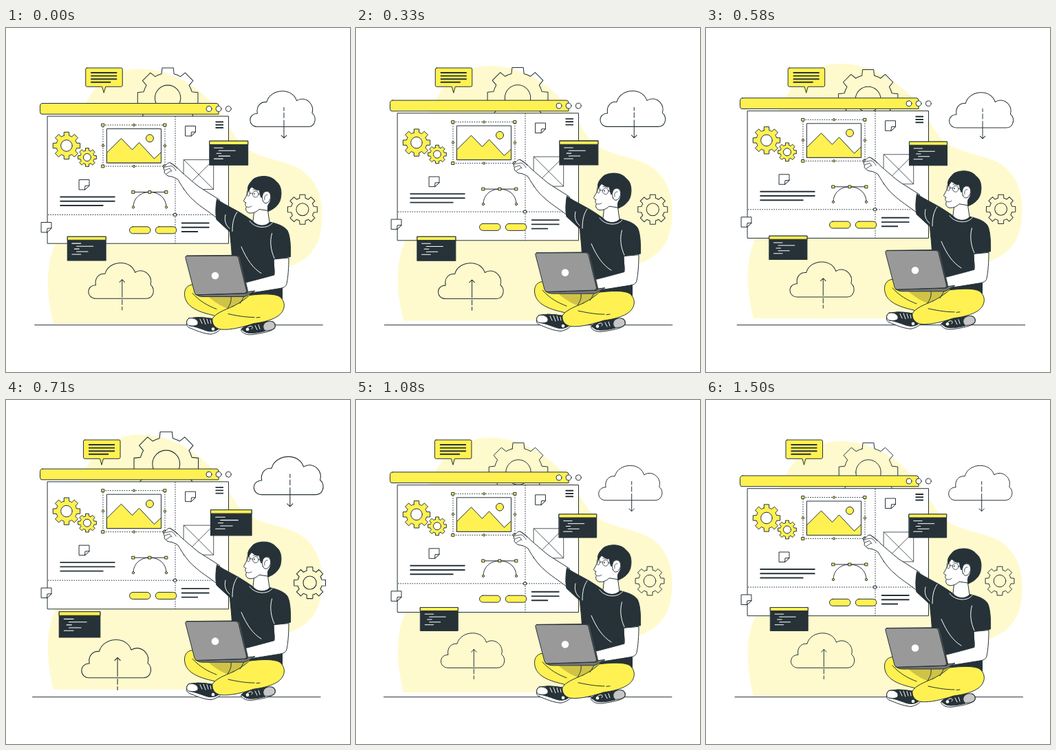
An HTML page that plays this animation: 500x500 px, repeating every 1540 ms.

```html
<!DOCTYPE html>
<html lang="en">
<head>
<meta charset="utf-8">
<title>Web design workspace</title>
<style>
html, body { margin: 0; width: 100%; height: 100%; overflow: hidden; background: #fff; }
svg { display: block; width: 100vw; height: 100vh; }
.ink { fill: none; stroke: #263238; stroke-width: 1; stroke-linecap: round; stroke-linejoin: round; }
.w { fill: #fff; }
.y { fill: #fff152; }
.d { fill: #263238; }
.bold { stroke-width: 1.9; stroke-linecap: butt; }
.thin { stroke-width: .8; }
.dots { stroke-dasharray: 1.6 1.8; stroke-linecap: butt; }
.chalk { fill: none; stroke: #fff; stroke-width: 1; stroke-linecap: round; }
</style>
</head>
<body>
<svg viewBox="0 0 500 500" xmlns="http://www.w3.org/2000/svg">
  <defs>
    <path id="cloud" class="ink" d="M10 50.5C4 50.5 0 46 0 41C0 35.5 4.5 31.3 10.4 31.6C8.5 22 14.5 14.5 23.5 15.5C26 5.5 36 0 46 0C56 0 63.5 5.5 66 13.5C72 9.5 80 10.5 85 16.5C88.8 21 89.5 26 88 31C92 34 93.5 40 91 45C89.5 48.5 86 50.5 82 50.5Z"/>
    <g id="term">
      <path class="ink d" d="M0 0H54.5V34H0Z"/>
      <path class="ink y" d="M0 0H54.5V5H0Z"/>
      <path class="chalk" d="M6.5 9.7H19M13 13.7H36.5M10 17.5H16.5M13 21.3H29M6.5 25.2H19"/>
    </g>
    <g id="note" class="ink">
      <path class="w" d="M0 0H14.5V8.5L8 14.5H0Z"/>
      <path class="w" d="M8 14.5L8.5 8.8L14.5 8.5Z"/>
    </g>
    <path id="knob" class="ink y" d="M-1.9-1.9H1.9V1.9H-1.9Z"/>
    <circle id="dot" class="ink y" r="1.6"/>
    <rect id="pill" class="ink y" width="30.5" height="10" rx="5"/>
  </defs>

  <g class="float">
    <path fill="#fffacd" d="M69 430.5C62 402 53 350 73 312C90 270 66 210 85 165C97 141 108 126 116 109C132 77 162 60 195 60C236 60 273 81 300 110C327 139 330 163 352 177C371 190 402 192 425 204C449 218 460 243 459.5 272C459.500 305 451 333 413 347C392 356 378 366 370 384L350 430.5Z"/>
  </g>
  <g class="beat"><path id="cog" class="ink"/></g>
  <path class="ink shake" d="M42 431.7H460.5"/>

  <g class="float">
    <g class="ink">
      <path class="w" d="M60.5 128.7H323.5V313.7H60.5Z"/>
      <path class="y" d="M53 110H306Q309 110 309 114V125.7H52Q49.5 125.7 49.5 122V114.5Q49.5 110 53 110Z"/>
      <circle class="w" cx="295" cy="118" r="4"/>
      <circle class="w" cx="309" cy="118" r="4"/>
      <circle class="w" cx="323.3" cy="118" r="4"/>
      <path class="dots" d="M246 129V313.5M61 272H323"/>
      <path class="w" d="M244 270.2H247.6V273.8H244Z"/>
      <path id="cogA" class="y"/>
      <circle class="w" cx="88" cy="171.5" r="8.3"/>
      <path id="cogB" class="y"/>
      <circle class="w" cx="118" cy="188.5" r="5.5"/>

      <path class="w" d="M146.8 147H225.5V196.5H146.8Z"/>
      <path class="y" d="M146.8 181.5L167.5 161L183.5 177.5L193.5 167L215.5 190.5L225.5 181V196.5H146.8Z"/>
      <circle class="y" cx="209" cy="160.8" r="5.5"/>
      <path class="dots" d="M141 141.5H231V201.5H141Z"/>

      <path class="thin w" d="M258.5 192H301.7V235H258.5ZL301.7 235M301.7 192L258.5 235"/>
      <path class="bold" d="M304.5 137H316M304.5 141.2H316M304.5 145.5H316"/>
      <path class="bold" d="M78.5 246H158.5M78.5 252.2H158.5M78.5 258.5H141.5"/>
      <path class="bold" d="M255 284H295.5M255 290.3H295.5M255 296.5H279"/>
      <path d="M185 261C185 248 195 239 209 239C223 239 233 248 233 261M185 239H233"/>
    </g>
    <use href="#knob" x="141" y="141.5"/><use href="#knob" x="231" y="141.5"/>
    <use href="#knob" x="141" y="201.5"/><use href="#knob" x="231" y="201.5"/>
    <use href="#dot" x="186" y="141.5"/><use href="#dot" x="231" y="171.5"/>
    <use href="#dot" x="186" y="201.5"/><use href="#dot" x="141" y="171.5"/>
    <use href="#knob" x="185" y="239"/><use href="#knob" x="209" y="239"/><use href="#knob" x="233" y="239"/>
    <use href="#dot" x="185" y="261"/><use href="#dot" x="233" y="261"/>
    <use href="#note" x="261" y="143"/><use href="#note" x="106.5" y="221"/><use href="#note" x="51.5" y="283"/>
    <use href="#pill" x="179.5" y="289.3"/><use href="#pill" x="217.3" y="289.3"/>
  </g>

  <g class="beat">
    <use href="#cloud" x="352.7" y="95.3"/>
    <use href="#cloud" x="123.5" y="338.8"/>
    <path class="ink" d="M400.7 118.5V123M400.7 126V133M400.7 136.5V161.5M397 158L400.7 161.7L404.4 158"/>
    <path class="ink" d="M171.3 405.5V401M171.3 398V391M171.3 387.5V362.5M167.6 366.2L171.3 362.5L175 366.2"/>
    <path id="cogC" class="ink"/>
    <circle class="ink" cx="427" cy="263" r="8.8"/>
    <use href="#term" x="295.2" y="166"/>
    <use href="#term" x="93.7" y="301.5"/>
  </g>

  <g class="shake ink">
    <path class="y" d="M118 58H167.5Q169.5 58 169.5 60V83Q169.5 85.3 167.5 85.3H145L142.5 94.3L140 85.3H118Q116 85.3 116 83V60Q116 58 118 58Z"/>
    <path class="bold" d="M123.5 65H161.5M123.5 69.6H161.5M123.5 74.2H161.5M123.5 78.7H152.5"/>
  </g>

  <g class="float">
    <!-- torso -->
    <g class="ink">
      <path class="w" d="M361 264L359 281C365 292 380 290 383 283L380 262Z"/>
      <path class="w" d="M310 250L280 231C270 223 261 215 254 209C250 204 244 199 239 196.5C236 195.5 234.5 197.5 231 201C229 203 229 206 230.5 208C229.5 210 230.5 212 232.5 213C234 216 238 216 241 216.5C245 218 247.5 219 250 221C257 233 265 245 274 252C282 260 293 266 308 278Z"/>
      <path class="thin" d="M231 202.5L240 201C243 202 245 204 247 208M231 207L238 204.5L241 209M233 212.5L240 208M239 196.5C242 199 245 201 249 205"/>
      <path class="d" d="M306.5 249.5C320 259 336 265 350 275L358 280.5C366 290 378 289 383.5 282.5C394 285 404 288 409 295C413 302 414 318 413.5 333L390 336.5L390 356L401.5 372V396H330L328.5 335C328 320 326 306 325.5 297L306 279C304 270 305 257 306.5 249.5Z"/>
    </g>
    <path class="chalk" d="M354 281C362 292 380 293 387 284M319 272C317 280 319 287 325 292M336 268C331 275 329 284 329 296M342 318.5C350 337 359 350 371 357M386.5 299C383 311 385 324 390 335"/>

    <!-- head -->
    <g class="ink">
      <path class="w" d="M355 232C352 239 350 244 345.5 251.5C346 253.5 347.5 254 349 254.3C347 257 348 259 349.5 260.5C347.5 264 349 268.5 354 269.5C359 270 364 268 368 264L381 266L388 250V232Z"/>
      <path class="d" d="M352 238C350 231 354 226 357 223C360 218 368 216 375 216C384 216 390 220 393 224C399 228 401 238 399.5 246C398.5 256 391 263 381 267C380 262 380 259 382 256C386 251 386 243 383 239C379 236 375 238 373 242L371 247C369 243 369 239 368 236C363 236 359 233 357 231C355 234 353 236 352 238Z"/>
      <path class="w" d="M373.5 252C371 246 373 239 378 238C383 237.5 386 243 384 249C382 255 376 258 373.5 252Z"/>
      <path class="thin" d="M376 250C375 246 377 242 380 243M354.3 240.5L358.5 241M367 241.5L373 243.5M359 235.8C361 234.5 364 235.3 366 237M350 260.5C352 261.5 355 261 357 259.5"/>
      <ellipse class="thin" cx="352.3" cy="240.5" rx="2.2" ry="4.3"/>
      <ellipse class="thin" cx="362.7" cy="242" rx="4.3" ry="4.5"/>
    </g>
    <ellipse class="d" cx="361" cy="241.5" rx=".7" ry="1.3"/>

    <!-- shoes -->
    <g class="ink">
      <path class="w" d="M264 424C261 429 262 434 266 436C276 440 287 445 298 445.5C305 444 310 441 313 437L302 423L279 421Z"/>
      <path class="d" d="M266 422.5C274 421 290 420 300 424L309 438C304 442 297 442.5 290 440C281 437 274 434 266 433C277 435 281 427 274 422Z"/>
      <path class="w" d="M266 422.5C261 426 262 432 266 433C274 434.5 280 433 279 428C278 424 272 421 266 422.5Z"/>
      <path class="w" d="M341.5 440C346 447 354 447 362 445.5C372 444 384 442 390 437.5C393 433 391 428 387 427L350 432Z"/>
      <path class="d" d="M342 438C350 431 364 429 379 427C373 431 372 437 377 441C366 443.5 352 446 347 442Z"/>
      <path fill="#c7c7c7" d="M379 427.5C385 425 392 428 391 435C389 439 383 440.5 377 440.5C372 437 373 430 379 427.5Z"/>
    </g>
    <path class="chalk" d="M282 423.5L285 430M287 423L290 431M292 423.5L294 430M297 425L298 430M351 436C355 432 361 434 357 438M362 433L365 439M367 432L369 438"/>
    <circle class="w" cx="301" cy="438" r="2.3"/>
    <circle class="w" cx="351" cy="438.5" r="2.3"/>

    <!-- legs -->
    <g class="ink">
      <path class="y" d="M273 373.5C261 373 257 384 261 395C266 408 283 414 301 418C316 423 326 428 350 432L379 427C384 420 382 405 370 398L350 386L300 382Z"/>
      <path fill="#cfc347" stroke="none" d="M290 387H355L342 400L321 408C309 403 299 396 290 387Z"/>
      <path class="y" d="M330 405C344 398 350 392 354 389C370 387 390 386 398 391C405 397 406 405 402 412C396 423 376 428 360 430C345 435 326 440 312 438.5C304 437 299 431 300 423C305 415 316 411 330 405Z"/>
      <path d="M323 416C341 420 352 421 361 421M364 421.5L369 421M271 386C282 398 293 404 306 409M322 408C326 402 328 397 327 391M340 401C343 397 344 393 346 391"/>
    </g>

    <!-- forearm and laptop -->
    <g class="ink">
      <path class="w" d="M389.5 336.5L411 334.5C411 348 410 363 408 372C407 377 403 378 398 379L370 383.5L346 387L346 371C362 367 377 363 389.5 359.5Z"/>
      <path d="M389.5 359.5C391 357 390 351 389.5 347"/>
      <path fill="#777" d="M276 388L351 384L362 382.5L350 389.5Q348 391 344 391H285Q280 391 276 388Z"/>
      <path fill="#555" d="M263 331.5L336 330.8Q339 331 340 334L351.5 383Q352 386 349 386.3L279 388.5Z"/>
      <path fill="#999" d="M263 331.8L334 331.5Q337 331.5 338 335L349.5 382Q350 385.5 347 386L278 388.3Q275 388.5 274 385L261 335Q260 332 263 331.8Z"/>
    </g>
    <circle class="w" cx="304" cy="360.5" r="5.3"/>
  </g>
</svg>
<script>
const LOOP = 1540, FRAMES = 37, STEP = LOOP / FRAMES;
const ORIGIN = [270.5, 234];

// keyframes as [position, value]
const FLOAT = [[0, 0], [.5, -10], [1, 0]];
const BEAT = [[0, 1], [.1, 1.1], [.3, 1], [.4, 1], [.5, 1.1], [.6, 1], [1, 1]];
const SHAKE = [[0, 0], [.1, -1], [.2, 2], [.3, -4], [.4, 4], [.5, -4], [.6, 4], [.7, -4], [.8, 2], [.9, -1], [1, 0]];

function track(keys, p) {
  const i = Math.max(1, keys.findIndex(k => k[0] >= p));
  const [a, u] = keys[i - 1], [b, v] = keys[i];
  return u + (v - u) * (p - a) / (b - a);
}

function gear(cx, cy, R, depth, hole = 0) {
  const at = (r, deg) => {
    const a = deg * Math.PI / 180;
    return (cx + r * Math.sin(a)).toFixed(2) + ' ' + (cy - r * Math.cos(a)).toFixed(2);
  };
  const r = R * (1 - depth);
  let d = '';
  for (let k = 0; k < 8; k++) {
    const c = k * 45;
    d += (k ? `A${r} ${r} 0 0 1 ` : 'M') + at(r, c - 14.5);
    d += 'L' + at(R, c - 10.5) + 'L' + at(R, c + 10.5) + 'L' + at(r, c + 14.5);
  }
  d += `A${r} ${r} 0 0 1 ${at(r, -14.5)}Z`;
  if (hole) d += `M${cx - hole} ${cy}a${hole} ${hole} 0 1 1 ${hole * 2} 0a${hole} ${hole} 0 1 1 ${-hole * 2} 0Z`;
  return d;
}

const shape = (id, d) => document.getElementById(id).setAttribute('d', d);
shape('cog', gear(236, 105, 43.5, .19, 18.2));
shape('cogA', gear(88, 171.5, 20, .25));
shape('cogB', gear(118, 188.5, 13.6, .25));
shape('cogC', gear(427, 263, 21.3, .23));

const pick = name => [...document.querySelectorAll('.' + name)];
const floaters = pick('float'), beaters = pick('beat'), shakers = pick('shake');
const move = (list, value) => list.forEach(el => el.setAttribute('transform', value));

function draw(ms) {
  const frame = Math.min(FRAMES - 1, Math.floor((ms % LOOP + 4) / STEP));
  const p = Math.min(1, .025 + frame * STEP / 1512);
  const [x, y] = ORIGIN;
  move(floaters, `translate(0 ${track(FLOAT, p)})`);
  move(shakers, `translate(${track(SHAKE, p)} 0)`);
  move(beaters, `translate(${x} ${y}) scale(${track(BEAT, p)}) translate(${-x} ${-y})`);
}

const start = performance.now();
function tick() {
  draw(performance.now() - start);
  requestAnimationFrame(tick);
}
tick();
</script>
</body>
</html>
```
